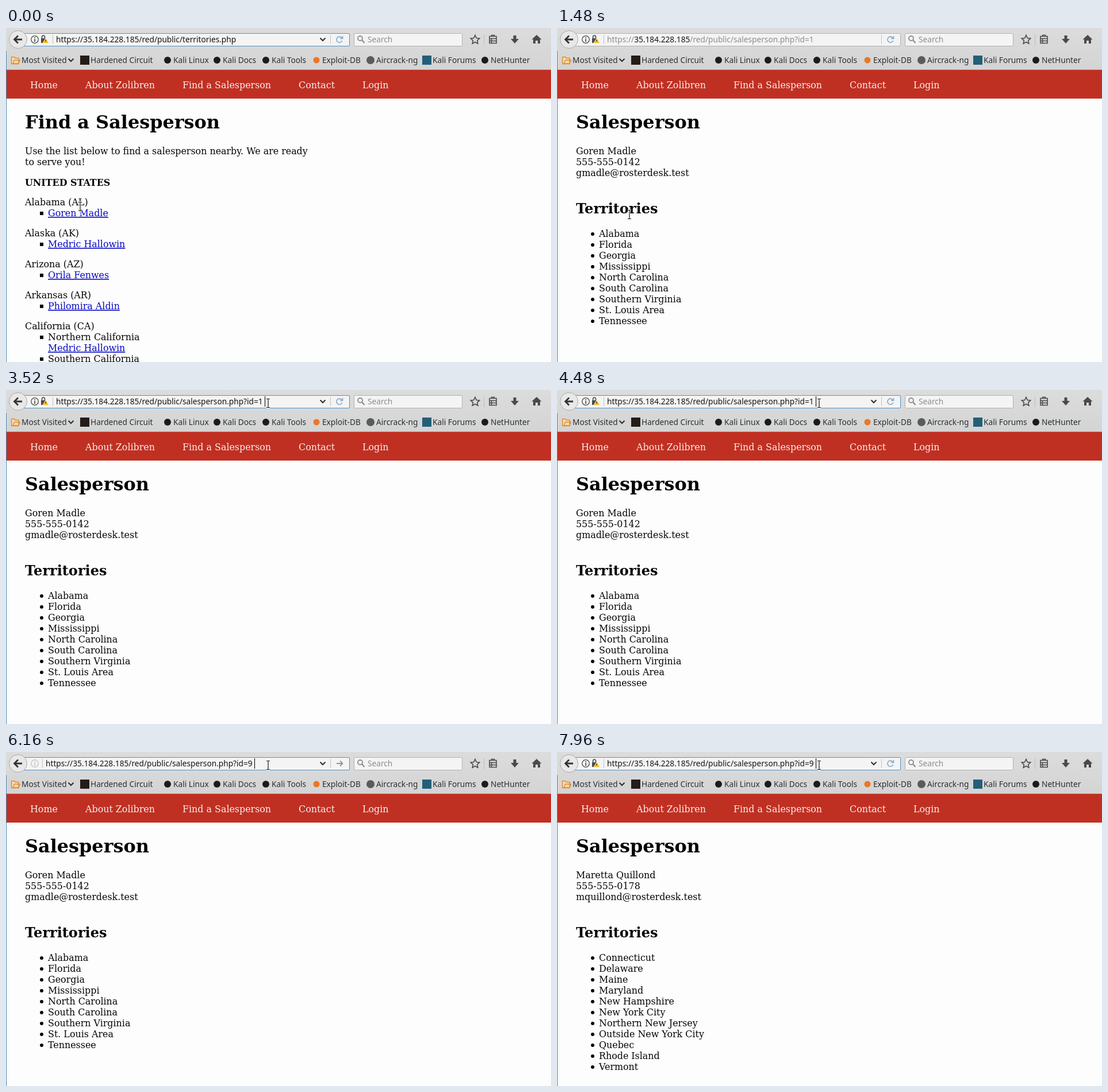
Animation of 948 by 582 pixels, one loop 8000 ms. Source, as an HTML page:

```html
<!DOCTYPE html>
<html lang="en">
<head>
<meta charset="utf-8">
<title>Salesperson lookup</title>
<style>
  html, body { margin: 0; width: 100%; height: 100%; overflow: hidden; background: #fdfdfd; }
  svg { display: block; width: 948px; height: 582px; }
  text { white-space: pre; }
  .page { font: 15.88px "DejaVu Serif", serif; fill: #060606; }
  .ui { font: 13.7px "Noto Sans", "Open Sans", sans-serif; fill: #2b2d2e; }
  .h1 { font-size: 31.9px; font-weight: bold; }
  .h2 { font-size: 24px; font-weight: bold; }
  .bold { font-weight: bold; }
  .link { fill: #0808c4; text-decoration: underline; }
  .nav { fill: #f8eeec; }
  .grey { fill: #8b8c8d; }
  .dark { fill: #141414; }
  .title { font-size: 14.2px; fill: #141414; }
  .blue { fill: #1616c4; }
  .addr { font-size: 12.8px; fill: #1616c4; }
  .line { fill: none; stroke: #4a4a4a; stroke-width: 1.6; }
</style>
</head>
<body>
<svg id="stage" viewBox="0 0 948 582" xmlns="http://www.w3.org/2000/svg"></svg>
<script>
const LOOP = 8000;
const CLICK_LINK = 680, PAGE_ONE = 1000, HOVER_BAR = 2440, CLICK_BAR = 3400;
const ERASE = 4560, POPUP = 4720, TYPE = 5200, ENTER = 6040, PAGE_NINE = 6480;
const BASE = '35.184.228.185';
const PATH = '/red/public/salesperson.php?id=';
const URL_TEXT = 'https://' + BASE + PATH;
const INK = '#4a4a4a', FIELD = '#f4f4f4';

const text = (x, y, s, cls = '') => `<text x="${x}" y="${y}" class="${cls}">${s}</text>`;
const rect = (x, y, w, h, fill, extra = '') =>
  `<rect x="${x}" y="${y}" width="${w}" height="${h}" fill="${fill}" ${extra}/>`;
const dot = (x, y, r, fill, extra = '') => `<circle cx="${x}" cy="${y}" r="${r}" fill="${fill}" ${extra}/>`;
const path = (d, extra = 'class="line"') => `<path d="${d}" ${extra}/>`;
const group = (cls, ...parts) => `<g class="${cls}">${parts.join('')}</g>`;
const chevron = (x, y) => path(`M${x - 4.5} ${y - 2}l4.5 4.5l4.5-4.5`, 'fill="none" stroke="#2b2d2e" stroke-width="2"');

// Each layer is shown only inside its [from, to) windows.
const layers = [];
const layer = (windows, ...parts) => {
  layers.push(windows);
  return `<g data-layer="${layers.length - 1}">${parts.join('')}</g>`;
};

function territories() {
  const states = [
    ['Alabama (AL)', 'Goren Madle'], ['Alaska (AK)', 'Medric Hallowin'],
    ['Arizona (AZ)', 'Orila Fenwes'], ['Arkansas (AR)', 'Philomira Aldin'],
  ];
  const bullet = y => rect(59, y - 8, 6, 6, '#060606');
  return group('page',
    text(33, 175, 'Find a Salesperson', 'h1'),
    text(33, 219.5, 'Use the list below to find a salesperson nearby. We are ready'),
    text(33, 238.5, 'to serve you!'),
    text(33, 274.5, 'UNITED STATES', 'bold'),
    ...states.map(([state, name], i) => {
      const y = 309 + i * 54;
      return text(33, y, state) + bullet(y + 19) + text(73, y + 19, name, 'link');
    }),
    text(33, 525, 'California (CA)'),
    bullet(544), text(73, 544, 'Northern California'), text(73, 563, 'Medric Hallowin', 'link'),
    bullet(582), text(73, 582, 'Southern California'));
}

function salesperson(contact, areas) {
  return group('page',
    text(33, 175, 'Salesperson', 'h1'),
    ...contact.map((s, i) => text(33, 219.5 + i * 19, s)),
    text(33, 323, 'Territories', 'h2'),
    ...areas.map((s, i) => dot(62, 359 + i * 19, 3, '#060606') + text(73, 364 + i * 19, s)));
}

function navigation() {
  const items = [[42, 'Home'], [138, 'About Zolibren'], [307, 'Find a Salesperson'], [509, 'Contact'], [620, 'Login']];
  return rect(0, 73, 948, 50, '#c03022') + group('page', ...items.map(([x, s]) => text(x, 105, s, 'nav')));
}

function bookmarks() {
  const items = [
    [147, 'Hardened Circuit'], [291, 'Kali Linux'], [377, 'Kali Docs'], [462, 'Kali Tools'],
    [550, 'Exploit-DB'], [644, 'Aircrack-ng'], [742, 'Kali Forums'], [843, 'NetHunter'],
  ];
  return group('ui',
    path('M9.5 62.5V50.5h5l1.5 2h6v10z M12 62l2.5-6h9.5l-2 6z', 'fill="#f5dcae" stroke="#e08a30" stroke-width="1.4"'),
    text(27, 61, 'Most Visited'), chevron(113, 55.5),
    rect(129, 48, 16, 16, '#241c18'),
    ...[281, 367, 452, 833].map(x => dot(x, 56, 6, '#1b1b1b')),
    dot(540, 56, 5.5, '#e8782a'), dot(634, 56, 7, '#5a5c5c'), rect(724, 48, 16, 16, '#235f78'),
    ...items.map(([x, s]) => text(x, 61, s)));
}

function chrome() {
  const box = 'rx="2" stroke="#b0b0b0"';
  return rect(0, 0, 948, 73, 'url(#bar)') + rect(0, 72, 948, 1, '#b9b4b2') +
    rect(24.5, 9.5, 573, 22, FIELD, box) + rect(605.5, 9.5, 188, 22, FIELD, box) +
    dot(616, 18, 4, 'none', 'stroke="#8b8c8d" stroke-width="1.8"') + path('M619 21l4.5 5', 'stroke="#8b8c8d" stroke-width="2.2"') +
    group('ui', text(629, 25, 'Search', 'grey')) +
    path('M816 12.5l2.3 5l5.4.6l-4 3.7l1.1 5.4l-4.8-2.7l-4.8 2.7l1.1-5.4l-4-3.7l5.4-.6z') +
    rect(831, 11, 1, 19, '#bdbdbd') +
    path('M841 14.5h12v12h-12zM844.5 14v-1.5h5V14M841 18.5h12M841 22.5h12M844.5 18v8') +
    path('M882.5 13h5v6h4.5l-7 8l-7-8h4.5z', `fill="${INK}"`) +
    path('M923 12l8.5 8h-2.5v7h-4v-5h-4v5h-4v-7h-2.5z', `fill="${INK}"`);
}

function popup() {
  const rows = [
    ['Sampy McSampleton (NOT PUBLIC UNTIL SEPT. 1)', 498, 10], ['Nelvia Tarrosk', 264, 2],
    ['', 187, 12], ['Slow Slowman (FIRED FOR STEALING)', 418, 11], ['Maretta Quillond', 278, 9],
    ['Goren Madle', 251, 0], ['Jom Pelder', 240, 5], ['Orila Fenwes', 247, 3],
  ];
  const globe = (y, fill, land) => dot(50, y, 7, fill) +
    path(`M46 ${y - 4}l4-1l1 3l-3 2l-1 3l-2-3zM51 ${y + 1}l4-2l-1 4l-3 3z`, `fill="${land}"`);
  const entry = ([name, x, id], i) => {
    const y = 139 + i * 30;
    const tail = id
      ? `<text x="${x + 18}" y="${y + .5}" class="addr"><tspan class="bold">${URL_TEXT}</tspan>${id}</text>`
      : text(x + 18, y + .5, 'Switch to Tab', 'addr') +
        path(`M20 ${y}v-3h2q0-7 6-7t6 7h2v3z`, 'fill="#a9a9a9"');
    return globe(y - 5, '#858585', '#d8d8d8') + text(69, y, name ? 'Salesperson: ' + name : BASE, 'title') +
      text(x, y, '—', 'addr') + tail;
  };
  const visit = (s, x, windows) => layer(windows,
    `<g fill="#fbfdff"><g style="font-size:14.55px">${text(69, 109, s, 'bold')}</g>` +
    `<g style="font-size:12.8px">${text(x, 109, '—')}${text(x + 17, 109.5, 'Visit')}</g></g>`);
  return rect(0, 364, 948, 11, 'url(#shade)') + rect(0, 40, 948, 324, '#f3f3f4') +
    rect(0, 40, 948, 44, '#ebebec') + rect(0, 40, 948, 1, '#c4c4c4') + rect(0, 84, 948, 1, '#cfcfcf') +
    rect(0, 363, 948, 1, '#bababa') + rect(7, 89, 941, 30, '#198dca') +
    group('ui',
      dot(30, 62, 8, '#1b9ad6'), rect(29, 60, 2, 6, '#fff'), rect(29, 57, 2, 2, '#fff'),
      text(46, 67, 'Would you like to improve your search experience with suggestions?', 'dark'),
      text(489, 67, 'Learn more...', 'blue'),
      rect(848.5, 47.5, 79, 29, '#dfdfdf', 'rx="2" stroke="#d0d0d0"'),
      text(879, 67, '<tspan text-decoration="underline">N</tspan>o', 'grey'),
      rect(938, 47, 10, 30, '#5fd013'),
      globe(104, '#e9f2f8', '#198dca'),
      visit(URL_TEXT, 471, [[POPUP, TYPE]]), visit(URL_TEXT + 9, 480, [[TYPE, ENTER]]),
      ...rows.map(entry));
}

function addressBar() {
  const info = color => dot(50, 20, 6.3, 'none', `stroke="${color}" stroke-width="1.3"`) +
    rect(49.2, 19, 1.7, 5, color) + rect(49.2, 16, 1.7, 1.8, color);
  const divider = x => rect(x, 12, 1, 16, '#c2c2c2');
  const settled = [[0, ERASE], [PAGE_NINE, LOOP]], editing = [[ERASE, PAGE_NINE]];
  const blurred = (windows, rest) => layer(windows,
    `<text x="87" y="25" class="grey">https://<tspan class="dark">${BASE}</tspan>${rest}</text>`);
  const focused = (windows, x, s) => layer(windows, text(x, 25, s, 'dark'));
  const list = '/red/public/territories.php';
  return layer([[0, CLICK_LINK], [CLICK_BAR, LOOP]],
      rect(24.5, 9.5, 573, 22, 'none', 'rx="2" stroke="#4a94cc"')) +
    dot(21, 20, 15.5, '#e8e8e8', 'stroke="#a9a9a9"') +
    path('M28 20H15M21 13.5L14.5 20L21 26.5', 'fill="none" stroke="#333" stroke-width="2.8"') +
    layer(settled, info(INK), divider(81),
      rect(61, 18, 8, 8, INK), path('M62.5 18v-2q0-3 2.5-3t2.5 3v2'),
      path('M69 17.5l5.5 9h-11z', `fill="#f8bf1c" stroke="${FIELD}" stroke-width=".7"`),
      rect(68.4, 20.5, 1.3, 3, '#302b10'),
      path('M584.5 18a5 5 0 1 0 .2 4M585.5 14v4.5h-4.5', 'fill="none" stroke="#86aacb" stroke-width="1.7"')) +
    layer(editing, info('#c4c4bc'), divider(63),
      path('M575 20h10M581 15.5l4.5 4.5l-4.5 4.5', 'fill="none" stroke="#8e9499" stroke-width="1.8"')) +
    divider(564) + layer([[0, CLICK_LINK], [HOVER_BAR, LOOP]], chevron(551, 19.5)) +
    group('ui',
      focused([[0, CLICK_LINK]], 87, 'https://' + BASE + list),
      blurred([[CLICK_LINK, PAGE_ONE]], list), blurred([[PAGE_ONE, CLICK_BAR]], PATH + 1),
      focused([[CLICK_BAR, ERASE]], 87, URL_TEXT + 1), focused([[ERASE, TYPE]], 69, URL_TEXT),
      focused([[TYPE, PAGE_NINE]], 69, URL_TEXT + 9), focused([[PAGE_NINE, LOOP]], 87, URL_TEXT + 9)) +
    layer([[CLICK_BAR, 4000], [4160, ERASE], [PAGE_NINE, 6640], [7400, LOOP]], rect(450, 11, 1, 18, '#000')) +
    layer([[ERASE, TYPE]], rect(425, 11, 1, 18, '#000')) +
    layer([[TYPE, 5800], [ENTER, PAGE_NINE]], rect(432, 11, 1, 18, '#000'));
}

function pointer() {
  const beam = 'M-3-7.5h2.5l.5.5l.5-.5h2.5M0-7V7M-3 7.5h2.5l.5-.5l.5.5h2.5';
  return `<g id="pointer">` +
    layer([[0, 480], [PAGE_ONE, POPUP], [ENTER, LOOP]],
      path(beam, 'fill="none" stroke="#fff" stroke-width="3"'),
      path(beam, 'fill="none" stroke="#111" stroke-width="1.2"')) +
    layer([[480, PAGE_ONE]],
      path('M-1 0q1.5-1.5 3 0v6l7 2q2 1 1 4l-2 5h-7l-6-8q0-2 2-1l2 2z', 'fill="#fff" stroke="#111"')) +
    layer([[POPUP, ENTER]],
      path('M0-2v16l3.7-3.5l2.8 6.5l2.6-1.2l-2.8-6.3h5z', 'fill="#080808" stroke="#fff"')) + `</g>`;
}

const south = ['Alabama', 'Florida', 'Georgia', 'Mississippi', 'North Carolina', 'South Carolina',
  'Southern Virginia', 'St. Louis Area', 'Tennessee'];
const north = ['Connecticut', 'Delaware', 'Maine', 'Maryland', 'New Hampshire', 'New York City',
  'Northern New Jersey', 'Outside New York City', 'Quebec', 'Rhode Island', 'Vermont'];

const gradient = (id, from, to) => `<linearGradient id="${id}" x2="0" y2="1">
  <stop stop-color="${from}"/><stop offset="1" stop-color="${to}"/></linearGradient>`;

const stage = document.getElementById('stage');
stage.innerHTML = `<defs>${gradient('bar', '#dcdcdd', '#d4d4d5')}${gradient('shade', '#b8b8b8', '#fdfdfd00')}</defs>` +
  rect(0, 0, 948, 582, '#fdfdfd') +
  layer([[0, PAGE_ONE]], territories()) +
  layer([[PAGE_ONE, PAGE_NINE]], salesperson(['Goren Madle', '555-555-0142', 'gmadle@rosterdesk.test'], south)) +
  layer([[PAGE_NINE, LOOP]], salesperson(['Maretta Quillond', '555-555-0178', 'mquillond@rosterdesk.test'], north)) +
  navigation() + chrome() + bookmarks() + addressBar() +
  layer([[POPUP, ENTER]], popup()) + rect(0, 40, 1, 542, '#4f86ac') + pointer();

const nodes = [...stage.querySelectorAll('[data-layer]')];
const pointerNode = document.getElementById('pointer');
const route = [[0, 129, 311], [240, 129, 311], [640, 126, 325], [1520, 126, 325],
  [2520, 442, 27], [2640, 442, 27], [3280, 456, 23], [LOOP, 456, 23]];

function pointerAt(t) {
  const i = route.findIndex(([time]) => time > t);
  const [t0, x0, y0] = route[i - 1], [t1, x1, y1] = route[i];
  const k = (t - t0) / (t1 - t0), eased = k * k * (3 - 2 * k);
  return [x0 + (x1 - x0) * eased, y0 + (y1 - y0) * eased].map(Math.round);
}

const start = performance.now();
function draw(now) {
  const t = Math.max(0, now - start) % LOOP;
  for (const node of nodes) {
    const shown = layers[node.dataset.layer].some(([from, to]) => t >= from && t < to);
    node.style.display = shown ? '' : 'none';
  }
  pointerNode.setAttribute('transform', `translate(${pointerAt(t)})`);
  requestAnimationFrame(draw);
}
draw(start);
</script>
</body>
</html>
```
